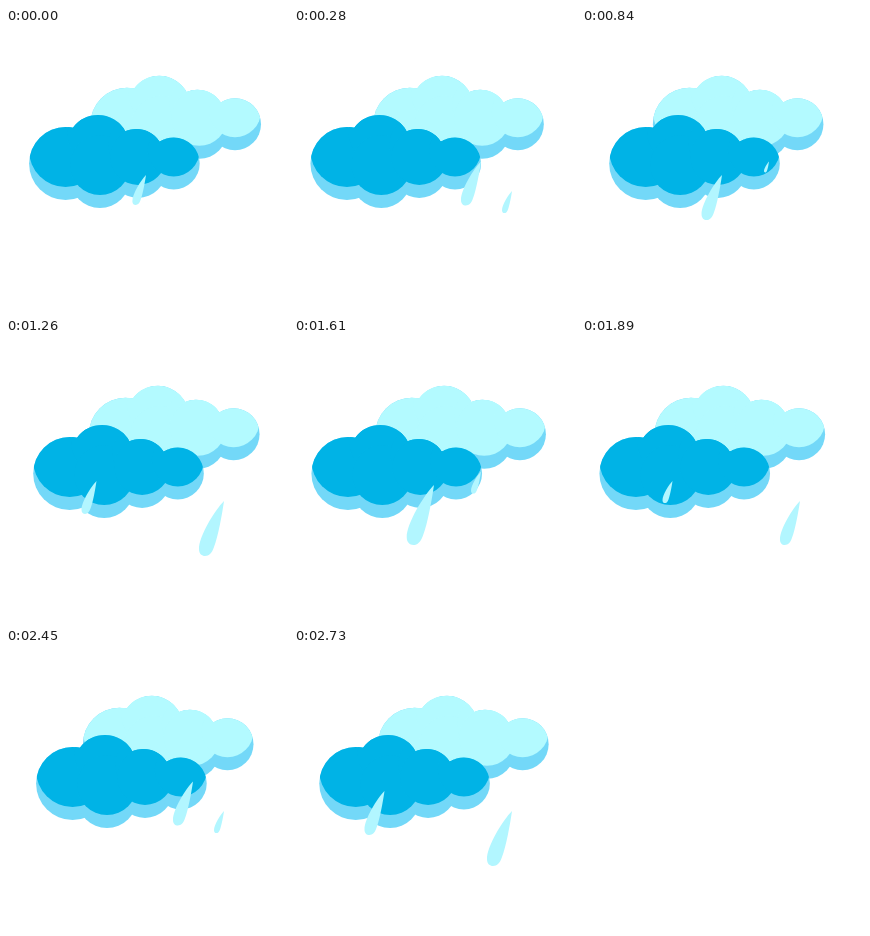
Write an HTML page that moves like this. It is 282 px wide and 282 px high and loops after 2800 ms.

```html
<!DOCTYPE html>
<html lang="en">
<head>
<meta charset="utf-8">
<title>Rain clouds</title>
<style>
  html, body { margin: 0; height: 100%; overflow: hidden; background: #fff; }
  svg { display: block; width: 100vw; height: 100vh; }
</style>
</head>
<body>
<svg viewBox="0 0 282 282">
  <defs>
    <g id="puffs">
      <circle cx="59.6" cy="135.5" r="36.5"/>
      <circle cx="92" cy="118" r="31"/>
      <circle cx="94" cy="150" r="30"/>
      <circle cx="130" cy="129" r="28"/>
      <circle cx="132" cy="142" r="28"/>
      <circle cx="167.7" cy="135.4" r="26"/>
    </g>
    <clipPath id="outline">
      <circle cx="59.6" cy="135.5" r="36.5"/>
      <circle cx="92" cy="118" r="31"/>
      <circle cx="94" cy="150" r="30"/>
      <circle cx="130" cy="129" r="28"/>
      <circle cx="132" cy="142" r="28"/>
      <circle cx="167.7" cy="135.4" r="26"/>
    </clipPath>
    <g id="cloud">
      <use href="#puffs" fill="#73d8f8"/>
      <g clip-path="url(#outline)"><use href="#puffs" y="-13"/></g>
    </g>
    <path id="drop" d="M0 0C-9 9-25 35-25 48C-25 53-22 55-19 55C-15 55-12 52-10 46C-6 36-2 14 0 0Z"/>
  </defs>
  <use id="back" href="#cloud" fill="#b3faff"/>
  <use id="front" href="#cloud" fill="#00b3e6"/>
  <g id="rain" fill="#b2f6ff"></g>
</svg>
<script>
  const STEP = 70, FRAMES = 40, CYCLE = 10, GROWTH = 5;
  const $ = id => document.getElementById(id);

  // Each drop grows from its tip; full is its final scale, hold the last visible step.
  const drops = [
    { x: 140, y: 147, full: 75 / 55, start: 2, hold: 5 },
    { x: 187, y: 133.5, full: 1, start: 4, hold: 5 },
    { x: 218, y: 163, full: 1, start: 6, hold: 6 },
    { x: 90.5, y: 143, full: 1, start: 8, hold: 5 }
  ];
  for (const drop of drops) {
    drop.el = document.createElementNS('http://www.w3.org/2000/svg', 'use');
    drop.el.setAttribute('href', '#drop');
    $('rain').append(drop.el);
  }

  const place = (el, x, y, scale = 1) =>
    el.setAttribute('transform', `translate(${x} ${y}) scale(${scale})`);

  function draw(now) {
    const frame = Math.floor(now / STEP) % FRAMES;
    const angle = frame / 20 * 2 * Math.PI;
    place($('back'), 53.8 + 7.5 * Math.cos(angle), -39.2);
    place($('front'), -7 * Math.sin(angle), 0);

    // The rain pauses for one step in its first cycle.
    const beat = frame + (frame < 10 ? 3 : 2);
    for (const { el, x, y, full, start, hold } of drops) {
      const age = (beat - start + CYCLE) % CYCLE + 1;
      const visible = age <= hold;
      el.setAttribute('visibility', visible ? 'visible' : 'hidden');
      if (visible) place(el, x, y, full * Math.min(age / GROWTH, 1));
    }
  }

  const origin = performance.now();
  function tick() {
    draw(performance.now() - origin);
    requestAnimationFrame(tick);
  }
  tick();
</script>
</body>
</html>
```
